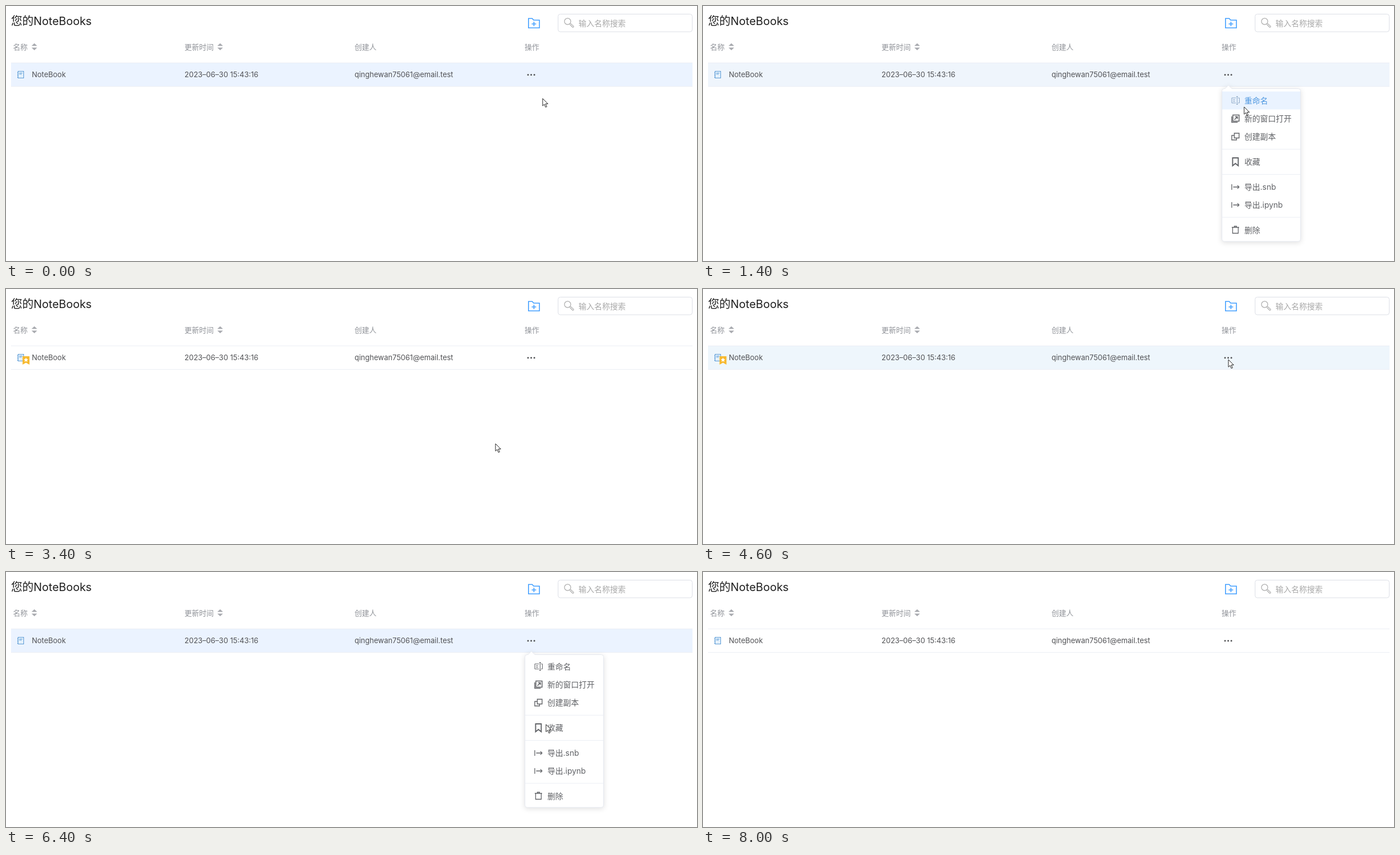
Animation, 1231 px wide and 455 px high, one loop 9.2 s. Source, as an HTML page:

```html
<!DOCTYPE html>
<html lang="zh-CN">
<head>
<meta charset="utf-8">
<style>
  html, body { margin: 0; width: 100%; height: 100%; overflow: hidden; background: #fff; }
  svg { display: block; font: 13px Inter, "Noto Sans CJK SC", "Noto Sans CJK", sans-serif; }
  text { fill: #505154; }
  .title { font-size: 20px; fill: #1f1f1f; }
  .head text { font-weight: 500; fill: #909399; }
  .head path { fill: #a9abb0; }
  .hint { font-size: 14px; fill: #a8a8a8; }
  .line { fill: none; stroke: #606266; stroke-width: 1.3; }
  .item text { font-size: 14px; fill: #606266; }
  .item rect.back { fill: none; }
  .item.on rect.back { fill: #eaf3ff; }
  .item.on text { fill: #4d97e0; }
  .item.on .line { stroke: #8ba6c4; }
  .box { fill: #fff; stroke: #e6e9f0; filter: drop-shadow(0 2px 5px rgba(0, 0, 0, .12)); }
</style>
</head>
<body>
<svg width="1231" height="455" viewBox="0 0 1231 455">
  <text class="title" x="9" y="34">您的NoteBooks</text>

  <g fill="none" stroke="#409eff" stroke-width="1.6">
    <path d="M930.8 22.3H937.5L940 25.3H950.3V39H930.8Z"/>
    <path d="M940.5 28V36M936.5 32H944.5"/>
  </g>

  <rect x="983.5" y="14.5" width="239" height="31.5" rx="4" fill="#fff" stroke="#dcdfe6"/>
  <g fill="none" stroke="#aaa" stroke-width="1.2">
    <circle cx="1000.5" cy="27.5" r="5.6"/>
    <path d="M1004.3 32.8L1009.2 37.7Q1010.6 38.6 1011.2 37Q1011.4 36.2 1010.6 35.6L1005.7 31.2"/>
  </g>
  <text class="hint" x="1020" y="35.5">输入名称搜索</text>

  <g class="head">
    <text x="12.5" y="78">名称</text>
    <text x="318" y="78">更新时间</text>
    <text x="621" y="78">创建人</text>
    <text x="924" y="78">操作</text>
    <path id="sort" d="M45.5 71.2L50.5 66.5L55.5 71.2ZM45.5 74.2L50.5 79L55.5 74.2Z"/>
    <use href="#sort" x="331"/>
  </g>

  <rect id="row" x="9" y="101" width="1214" height="42.5"/>
  <path d="M9 101.5H1223M9 143.5H1223" stroke="#ebeef5"/>
  <g fill="none" stroke="#5b9bd5">
    <rect x="21.5" y="116.5" width="10" height="12" fill="#e3f0fc"/>
    <path d="M23.5 119.5H29.5M23.5 121.5H28" stroke-width=".9"/>
    <path d="M20 118.5H22M20 121.5H22M20 124.5H22M20 127.5H22"/>
  </g>
  <g id="badge">
    <path d="M29.5 120H41.8V135L35.6 131.5L29.5 135Z" fill="#f7b92f"/>
    <path d="M35.6 122.3L36.8 124.9L39.6 125.2L37.5 127.1L38.1 129.9L35.6 128.5L33.1 129.9L33.7 127.1L31.6 125.2L34.4 124.9Z" fill="#fff"/>
  </g>
  <text x="46" y="127">NoteBook</text>
  <text x="318" y="127">2023–06–30 15:43:16</text>
  <text x="621" y="127">qinghewan75061@email.test</text>
  <g fill="#505154">
    <circle cx="930" cy="122.8" r="1.5"/>
    <circle cx="935.6" cy="122.8" r="1.5"/>
    <circle cx="941.2" cy="122.8" r="1.5"/>
  </g>

  <g id="menu">
    <path class="box" d="M928.5 147.5H930L936 141.5L942 147.5H1060.5Q1064.5 147.5 1064.5 151.5V416Q1064.5 420 1060.5 420H928.5Q924.5 420 924.5 416V151.5Q924.5 147.5 928.5 147.5Z"/>
    <path d="M925 255.5H1064M925 300.5H1064M925 377H1064" stroke="#ebeef5"/>
  </g>

  <path id="cursor" d="M0 0V13.2L3.1 10.4L5.2 15.6L7.4 14.7L5.2 9.6H9.4Z" fill="#fff" stroke="#222" stroke-linejoin="round"/>
</svg>
<script>
const STEP = 200, LOOP = 9200;
const get = id => document.getElementById(id);

// Icons are drawn around the centre of their menu line.
const arrow = 'M-6.5 -5V5M-4 0H6.5M3.5 -3L6.5 0L3.5 3';
const bookmark = 'M-5 -7H5V7L0 3L-5 7Z';
const star = 'M0 -6.5L1.9 -2.2L6.6 -1.8L3 1.3L4.1 6L0 3.5L-4.1 6L-3 1.3L-6.6 -1.8L-1.9 -2.2ZM3 3L6.5 6.5';
const entries = [
  [168.5, '重命名', 'M1 -4.5H-6.5V4.5H1M-4.5 -1.3H-.5M-4.5 1.6H-.5M3 -7V7M1.5 -7H4.5M1.5 7H4.5M4.5 -4.5H7V4.5H4.5', 1],
  [201, '新的窗口打开', 'M-4.5 -6.5H6.5V4.5H-4.5ZM-6.5 -4V6.5H4M-1.8 2L3.5 -3.5M-.5 -3.5H3.5V.5', 1.5],
  [233, '创建副本', 'M-2 -6H6.5V2.5H-2ZM-2 -2H-6.5V6H2V2.5', 1.4],
  [278, '收藏', bookmark, 1.9],
  [323, '导出.snb', arrow, 1.3],
  [355, '导出.ipynb', arrow, 1.3],
  [399.5, '删除', 'M-6.5 -4.5H6.5M-2 -4.5V-6.5H2V-4.5M-5 -4.5V6H5V-4.5', 1.3]
];

const menu = get('menu');
menu.insertAdjacentHTML('beforeend', entries.map(([y, label, icon, width]) =>
  `<g class="item" transform="translate(948.5 ${y})">
    <rect class="back" x="-23.5" y="-16" width="139" height="32"/>
    <path class="line" d="${icon}" style="stroke-width:${width}"/>
    <text x="16" y="5.3">${label}</text>
  </g>`).join(''));
const items = [...menu.querySelectorAll('.item')];
const favourite = items[3];

// Pointer stops: time, x, y
const stops = [
  [0, 956, 165], [400, 937, 124], [1000, 937, 124], [1400, 964, 180],
  [2000, 983, 273], [2600, 983, 273], [3000, 945, 274], [3400, 872, 276],
  [3800, 872, 276], [4400, 936, 126], [5000, 936, 126], [5400, 944, 172],
  [6200, 962, 272], [7000, 962, 272], [7400, 840, 310], [7800, 592, 418],
  [LOOP, 592, 418]
];
const tints = [
  [0, '#ebf3ff'], [400, '#eff5fc'], [2600, '#fbfdff'], [2800, '#fff'],
  [4200, '#f6fafe'], [4400, '#eef6fc'], [6400, '#ebf3ff'], [6600, '#f7faff'], [6800, '#fff']
];
const within = (t, from, to) => t >= from && t < to;

function pointerAt(t) {
  const next = stops.findIndex(stop => stop[0] > t);
  const [t0, x0, y0] = stops[next - 1], [t1, x1, y1] = stops[next];
  const k = (t - t0) / (t1 - t0);
  return [x0 + (x1 - x0) * k, y0 + (y1 - y0) * k];
}

function draw() {
  const t = Math.floor(performance.now() % LOOP / STEP) * STEP;
  const [x, y] = pointerAt(t);
  const saved = within(t, 2600, 6400);
  const clicked = within(t, 2600, 4000) || t >= 6400;

  get('cursor').setAttribute('transform', `translate(${x} ${y})`);
  get('cursor').style.display = t < 8000 ? '' : 'none';
  get('row').style.fill = tints.findLast(([from]) => from <= t)[1];
  get('badge').style.display = saved ? '' : 'none';
  menu.style.display = within(t, 800, 3200) || within(t, 4800, 7600) ? '' : 'none';

  items.forEach((item, i) =>
    item.classList.toggle('on', !clicked && Math.abs(y - entries[i][0]) < 16));
  favourite.querySelector('text').textContent = saved ? '取消收藏' : '收藏';
  const icon = favourite.querySelector('.line');
  icon.setAttribute('d', saved ? star : bookmark);
  icon.style.strokeWidth = saved ? 1.2 : 1.9;

  requestAnimationFrame(draw);
}
draw();
</script>
</body>
</html>
```
